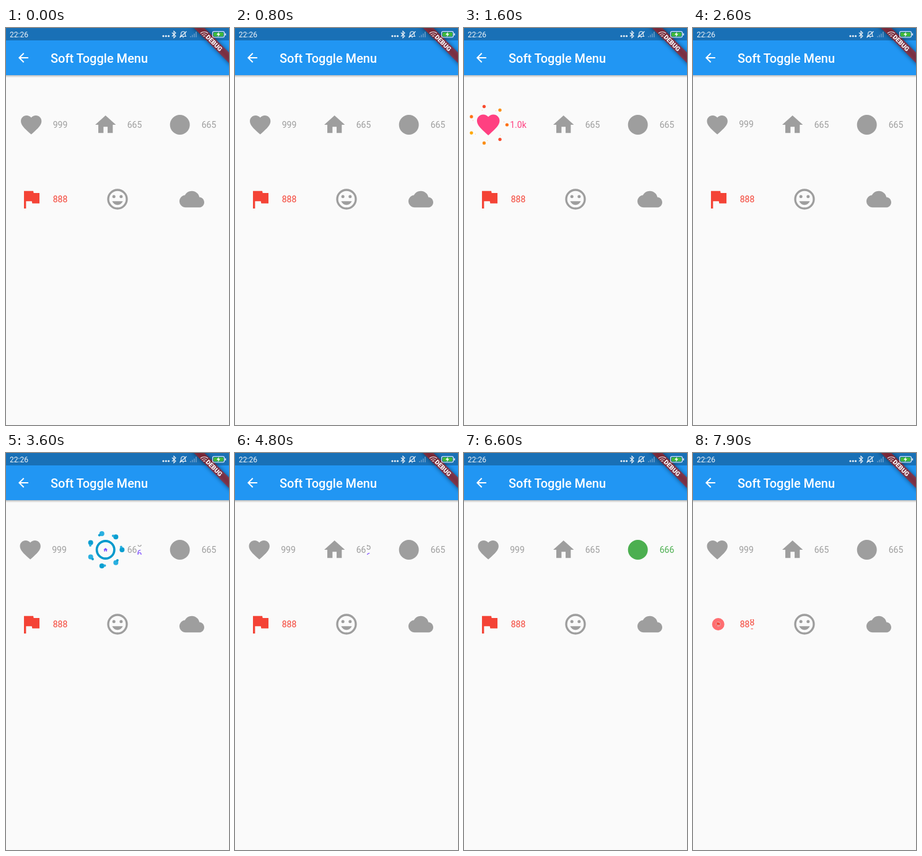
An HTML page that plays this animation: 360x640 px, repeating every 8 s.

```html
<!DOCTYPE html>
<html lang="en">
<head>
<meta charset="utf-8">
<title>Soft Toggle Menu</title>
<style>
  html, body { margin: 0; width: 100%; height: 100%; overflow: hidden; background: #fafafa; }
  svg { display: block; width: 360px; height: 640px; }
  text { font-family: Roboto, sans-serif; }
  .count { font-size: 14px; }
</style>
</head>
<body>
<svg id="stage" viewBox="0 0 360 640">
  <defs>
    <linearGradient id="shade" x2="0" y2="1">
      <stop stop-color="#000" stop-opacity=".25"/>
      <stop offset="1" stop-color="#000" stop-opacity="0"/>
    </linearGradient>
    <clipPath id="countClip"><rect x="-1" y="-8" width="40" height="16"/></clipPath>
    <filter id="soft" x="-20%" y="-150%" width="140%" height="400%"><feGaussianBlur stdDeviation="3.5"/></filter>
  </defs>
  <rect width="360" height="640" fill="#fafafa"/>
  <rect y="76" width="360" height="4" fill="url(#shade)"/>
  <rect width="360" height="76" fill="#2196f3"/>
  <rect width="360" height="20" fill="#1970b6"/>

  <path transform="translate(16 36)" fill="#fff" d="M20 11H7.83l5.59-5.59L12 4l-8 8 8 8 1.41-1.41L7.83 13H20z"/>
  <text x="72" y="55.5" font-size="20" font-weight="500" fill="#fff">Soft Toggle Menu</text>

  <g transform="translate(360 0) rotate(45)">
    <rect x="-60" y="28" width="120" height="12" opacity=".5" filter="url(#soft)"/>
    <rect x="-60" y="28" width="120" height="12" fill="#b71c1c" opacity=".63"/>
    <text y="37.7" font-size="10.2" font-weight="900" text-anchor="middle" fill="#fff">DEBUG</text>
  </g>

  <g fill="#f0f4f8">
    <text x="6" y="15" font-size="12">22:26</text>
    <circle cx="254" cy="13" r="1.6"/><circle cx="258.3" cy="13" r="1.6"/><circle cx="262.6" cy="13" r="1.6"/>
  </g>
  <g fill="none" stroke="#f0f4f8" stroke-width="1.1">
    <path d="M268 7.5l6 5.5-3 3V5l3 3-6 5.5"/>
    <path d="M281.5 13.5h9l-1.2-2V9a3.3 3.3 0 0 0-6.6 0v2.5zM285 15h2M280.5 15.5l11-10"/>
    <path d="M314 8.5a9 9 0 0 1 12 0M316.2 11a6 6 0 0 1 7.6 0M318.3 13.2a3 3 0 0 1 3.4 0"/>
    <rect x="333.5" y="5.5" width="19" height="9.5" rx="2.5"/>
    <path d="M354.3 8.5v3.5" stroke-width="1.6"/>
  </g>
  <path d="M297 15h2v-2h-2zm3 0h2v-4h-2zm3 0h2V9h-2zm3 0h2V6h-2z" fill="#6f9fcb" opacity=".7"/>
  <rect x="335" y="7" width="16" height="6.5" rx="1.3" fill="#3fb83a"/>
  <path d="M344 6l-4 5h2.6l-.8 3.6 4-5h-2.6z" fill="#fff"/>

  <g fill="#9e9e9e">
    <g transform="translate(160 256) scale(1.6667)">
      <circle cx="12" cy="12" r="9" fill="none" stroke="#9e9e9e" stroke-width="2"/>
      <circle cx="8.5" cy="9.5" r="1.5"/><circle cx="15.5" cy="9.5" r="1.5"/>
      <path d="M12 17.5c2.33 0 4.31-1.46 5.11-3.5H6.89c.8 2.04 2.78 3.5 5.11 3.5z"/>
    </g>
    <path transform="translate(280 256) scale(1.6667)" d="M19.35 10.04C18.67 6.59 15.64 4 12 4 9.11 4 6.6 5.64 5.35 8.04 2.34 8.36 0 10.91 0 14c0 3.31 2.69 6 6 6h13c2.76 0 5-2.24 5-5 0-2.64-2.05-4.78-4.65-4.96z"/>
  </g>
</svg>
<script>
const LOOP = 8000, BURST = 1000, SLIDE = 500;
const DIGIT = 7.86, LINE = 16, BASELINE = 5, RADIUS = 16;
const GREY = '#9e9e9e';

const buttons = [
  { x: 40.7, likedX: 39.2, y: 156, like: 1000, unlike: 2145, prefix: '', off: '999', on: '1.0k', color: '#ff4081',
    ring: [[255, 87, 34], [255, 193, 7]],
    dots: [[255, 193, 7], [255, 152, 0], [255, 87, 34], [244, 67, 54]],
    icon: 'M12 21.35l-1.45-1.32C5.4 15.36 2 12.28 2 8.5 2 5.42 4.42 3 7.5 3c1.74 0 3.41.81 4.5 2.09C13.09 3.81 14.76 3 16.5 3 19.58 3 22 5.42 22 8.5c0 3.78-3.4 6.86-8.55 11.54z' },
  { x: 160.7, y: 156, like: 3290, unlike: 4450, prefix: '66', off: '5', on: '6', color: '#7c4dff',
    ring: [[0, 221, 255], [0, 153, 204]],
    dots: [[51, 181, 229], [0, 153, 204]],
    icon: 'M10 20v-6h4v6h5v-8h3L12 3 2 12h3v8z' },
  { x: 280.7, y: 156, like: 5395, unlike: 6650, prefix: '66', off: '5', on: '6', color: '#4caf50',
    ring: [[102, 153, 0], [102, 153, 0]],
    dots: [[102, 153, 0], [153, 204, 0]],
    icon: 'M2.4 12a9.6 9.6 0 0 1 19.2 0a9.6 9.6 0 0 1-19.2 0z' },
  { x: 40.7, y: 276, like: 7800, unlike: Infinity, prefix: '88', off: '8', on: '9', color: '#f44336', alwaysOn: true,
    ring: [[255, 138, 128], [255, 23, 68]],
    dots: [[229, 115, 115], [239, 154, 154]],
    icon: 'M14.4 6L14 4H5v17h2v-7h5.6l.4 2h7V6z' },
];

const clamp = v => Math.min(1, Math.max(0, v));
const lerp = (a, b, p) => a + (b - a) * p;
const span = (v, from, to) => clamp((v - from) / (to - from));
const mix = (a, b, p) => `rgb(${a.map((v, i) => Math.round(lerp(v, b[i], p)))})`;
const bezier = (a, b, s) => 3 * a * s * (1 - s) ** 2 + 3 * b * s * s * (1 - s) + s ** 3;

function ease(x) {
  let lo = 0, hi = 1;
  for (let i = 0; i < 20; i++) {
    const mid = (lo + hi) / 2;
    if (bezier(.25, .25, mid) < x) lo = mid; else hi = mid;
  }
  return bezier(.1, 1, lo);
}

function overshoot(x) {
  const u = x - 1;
  return u * u * (3.5 * u + 2.5) + 1;
}

function set(node, attrs) {
  for (const key in attrs) node.setAttribute(key, attrs[key]);
}

function add(parent, tag, attrs = {}) {
  const node = document.createElementNS('http://www.w3.org/2000/svg', tag);
  set(node, attrs);
  return parent.appendChild(node);
}

function build(b) {
  b.root = add(document.getElementById('stage'), 'g');
  b.burst = add(b.root, 'g');
  b.bubbles = Array.from({ length: 14 }, () => add(b.burst, 'circle'));
  b.circle = add(b.burst, 'circle', { fill: 'none' });
  b.glyph = add(b.root, 'path', { d: b.icon });
  const count = add(b.root, 'g', { class: 'count', transform: 'translate(35 0)' });
  b.fixed = add(count, 'text', { y: BASELINE });
  b.fixed.textContent = b.prefix;
  const slot = add(count, 'g', { transform: `translate(${b.prefix.length * DIGIT} 0)` });
  const clipped = add(slot, 'g', { 'clip-path': 'url(#countClip)' });
  b.offText = add(clipped, 'text', { fill: b.alwaysOn ? b.color : GREY });
  b.offText.textContent = b.off;
  b.onText = add(clipped, 'text', { fill: b.color });
  b.onText.textContent = b.on;
}

function drawBubbles(b, t) {
  const p = 1 - (1 - span(t, .1, 1)) ** 2;
  const outerR = p < .3 ? lerp(0, 25.6, p / .3) : lerp(25.6, 32, span(p, .3, 1));
  const innerR = 25.6 * span(p, 0, .3);
  const outerSize = p ? 4 * (1 - span(p, .7, 1)) : 0;
  const innerSize = !p ? 0 : p < .5 ? lerp(4, 1.2, span(p, .2, .5)) : lerp(1.2, 0, span(p, .5, 1));
  const n = b.dots.length, step = Math.floor(p * 2), blend = p * 2 - step;
  b.bubbles.forEach((dot, k) => {
    const inner = k > 6, i = k % 7, c = i % 4 + step + (inner ? 1 : 0);
    const angle = (i * 51.42 - (inner ? 10 : 0)) * Math.PI / 180;
    const r = inner ? innerR : outerR;
    set(dot, {
      cx: r * Math.cos(angle), cy: r * Math.sin(angle), r: inner ? innerSize : outerSize,
      fill: mix(b.dots[c % n], b.dots[(c + 1) % n], blend),
    });
  });
}

function drawRing(b, t) {
  const progress = lerp(.1, 1, ease(span(t, 0, .3)));
  const outer = RADIUS * progress;
  const hole = RADIUS * lerp(.2, 1, ease(span(t, .2, .5))) + 1;
  set(b.circle, {
    r: (outer + hole) / 2, 'stroke-width': Math.max(0, outer - hole),
    stroke: mix(b.ring[0], b.ring[1], span(progress, .5, 1)),
  });
}

function draw(b, now) {
  const liked = now >= b.like && now < b.unlike;
  const t = (now - b.like) / BURST;
  const bursting = liked && t < 1;
  const x = now >= b.like && b.likedX || b.x;
  set(b.root, { transform: `translate(${x} ${b.y})` });
  set(b.burst, { visibility: bursting ? 'visible' : 'hidden' });
  if (bursting) {
    drawBubbles(b, t);
    drawRing(b, t);
  }
  const scale = bursting ? lerp(.2, 1, overshoot(span(t, .35, .7))) : 1;
  set(b.glyph, {
    transform: `scale(${scale * 5 / 3}) translate(-12 -12)`,
    fill: liked || b.alwaysOn ? b.color : GREY,
  });

  const up = span(now, b.like, b.like + SLIDE);
  const down = now >= b.unlike ? span(now, b.unlike, b.unlike + SLIDE) : 0;
  const shown = up - down;
  set(b.fixed, { fill: shown === 1 || b.alwaysOn ? b.color : GREY });
  set(b.offText, { y: BASELINE - LINE * shown });
  set(b.onText, { y: BASELINE + LINE * (1 - shown) });
}

function frame() {
  const now = performance.now() % LOOP;
  buttons.forEach(b => draw(b, now));
  requestAnimationFrame(frame);
}

buttons.forEach(build);
frame();
</script>
</body>
</html>
```
